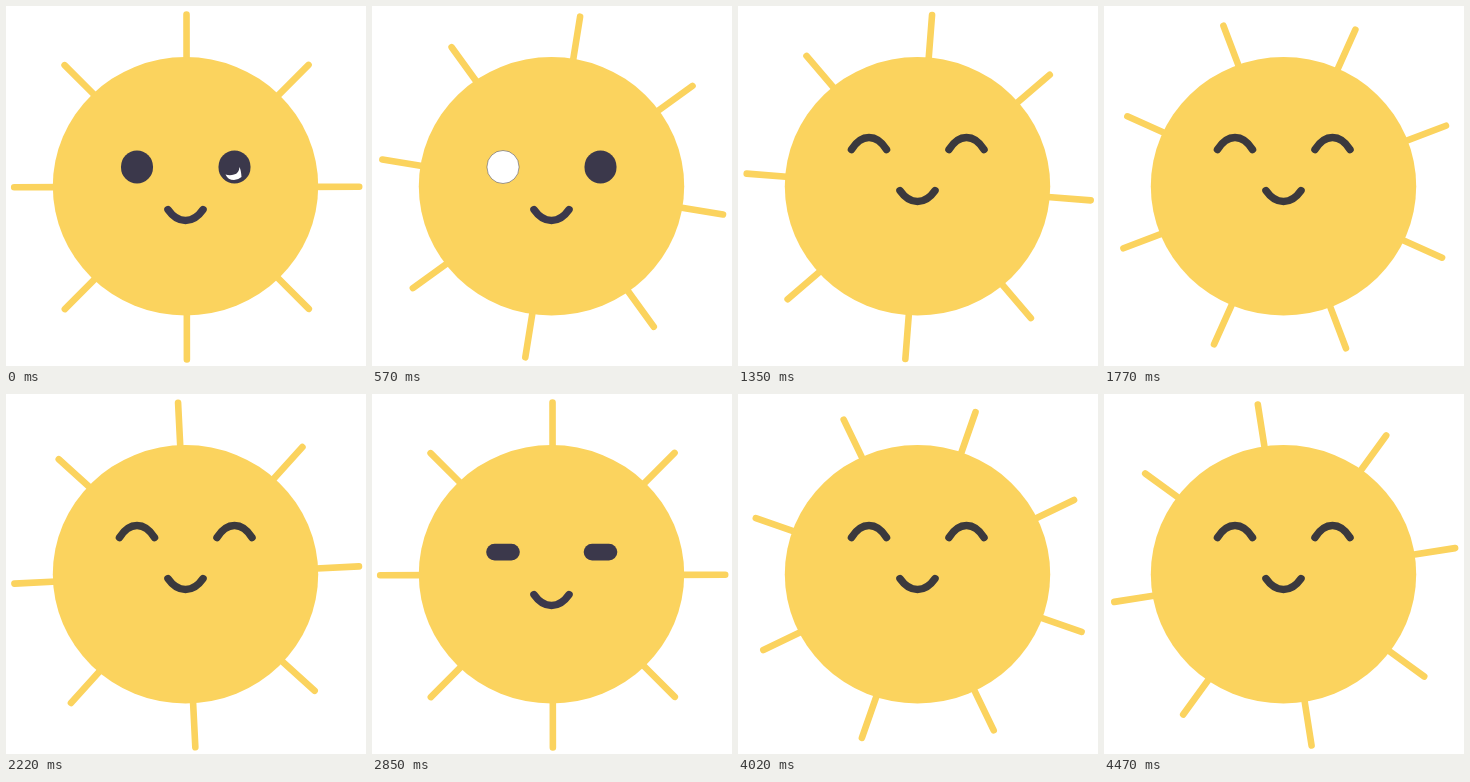
These frames come from a looping animation (360 by 360 pixels, 4.5 s). An HTML page:

```html
<!DOCTYPE html>
<html lang="en">
<head>
<meta charset="utf-8">
<title>Smiling sun</title>
<style>
  html, body { margin: 0; height: 100%; overflow: hidden; background: #fff; }
  svg { display: block; width: 100%; height: 100%; }
  .line { fill: none; stroke-width: 7.5; stroke-linecap: round; }
</style>
</head>
<body>
<svg viewBox="0 0 360 360">
  <g id="rays" stroke="#fbd35e" stroke-width="6.6" stroke-linecap="round"></g>
  <ellipse cx="179.5" cy="180.3" rx="132.7" ry="129.2" fill="#fbd35e"/>
  <g id="eyes"></g>
  <path id="glint" fill="#fff" d="M233.5 161Q235 164 235.5 171Q232 174 228 174Q222 174 219.5 168.5Q224 170 228 168.5Q233 167.5 233.5 161Z"/>
  <path id="mouth" class="line" d="M162 203.7c10 14.5 25 14.5 35 0"/>
</svg>
<script>
const LOOP = 4500, CYCLE = 2880;
const OPEN = '#3b384b', HAPPY = '#3b393d';
const EYE_X = [131, 228.5];
// Time in ms and rotation of the rays in degrees
const TURN = [[0, 0], [570, -35.8], [1350, -85.5], [2220, -137.8],
              [2850, -180], [3600, -224.4], [4470, -278.9], [4500, -280.8]];

const $ = id => document.getElementById(id);
const clamp = v => Math.max(0, Math.min(1, v));

for (let i = 0; i < 8; i++) {
  $('rays').innerHTML += `<path d="M0-120V-172.5" transform="rotate(${i * 45})"/>`;
}

function turnAt(t) {
  const i = TURN.findIndex(key => key[0] > t);
  const [t0, a0] = TURN[i - 1], [t1, a1] = TURN[i];
  return a0 + (a1 - a0) * (t - t0) / (t1 - t0);
}

// An open eye flattens into a bar, then bends into a smiling arc
function eye(x, smile, blank) {
  const y = 161 - 18 * smile, h = 33 - 100 * smile;
  if (h > 7.5) {
    const w = 32 + 10 * smile;
    return `<rect x="${x - w / 2}" y="${y - h / 2}" width="${w}" height="${h}"
      rx="${Math.min(16, h / 2)}" fill="${blank ? '#fff' : OPEN}"
      stroke="${OPEN}" stroke-width="${blank ? 0.5 : 0}"/>`;
  }
  const rise = 16 * clamp((smile - 0.26) / 0.74);
  return `<path class="line" stroke="${HAPPY}"
    d="M${x - 17.5} ${y + 0.5}c10 ${-rise} 25 ${-rise} 35 0"/>`;
}

function draw(now) {
  const t = now % LOOP, u = t % CYCLE;
  const smile = clamp((u - 960) / 180) - clamp((u - 2700) / 180);
  const blank = u >= 540 && u < 630;

  $('rays').setAttribute('transform', `translate(180.7 181) rotate(${turnAt(t)})`);
  $('eyes').innerHTML = EYE_X.map((x, i) => eye(x, smile, blank && i === 0)).join('');
  $('glint').setAttribute('visibility', smile || blank ? 'hidden' : 'visible');
  $('mouth').setAttribute('transform', `translate(0 ${-19 * smile})`);
  $('mouth').setAttribute('stroke', smile > 0.5 ? HAPPY : OPEN);
}

const start = performance.now();
function tick() {
  draw(performance.now() - start);
  requestAnimationFrame(tick);
}
tick();
</script>
</body>
</html>
```
